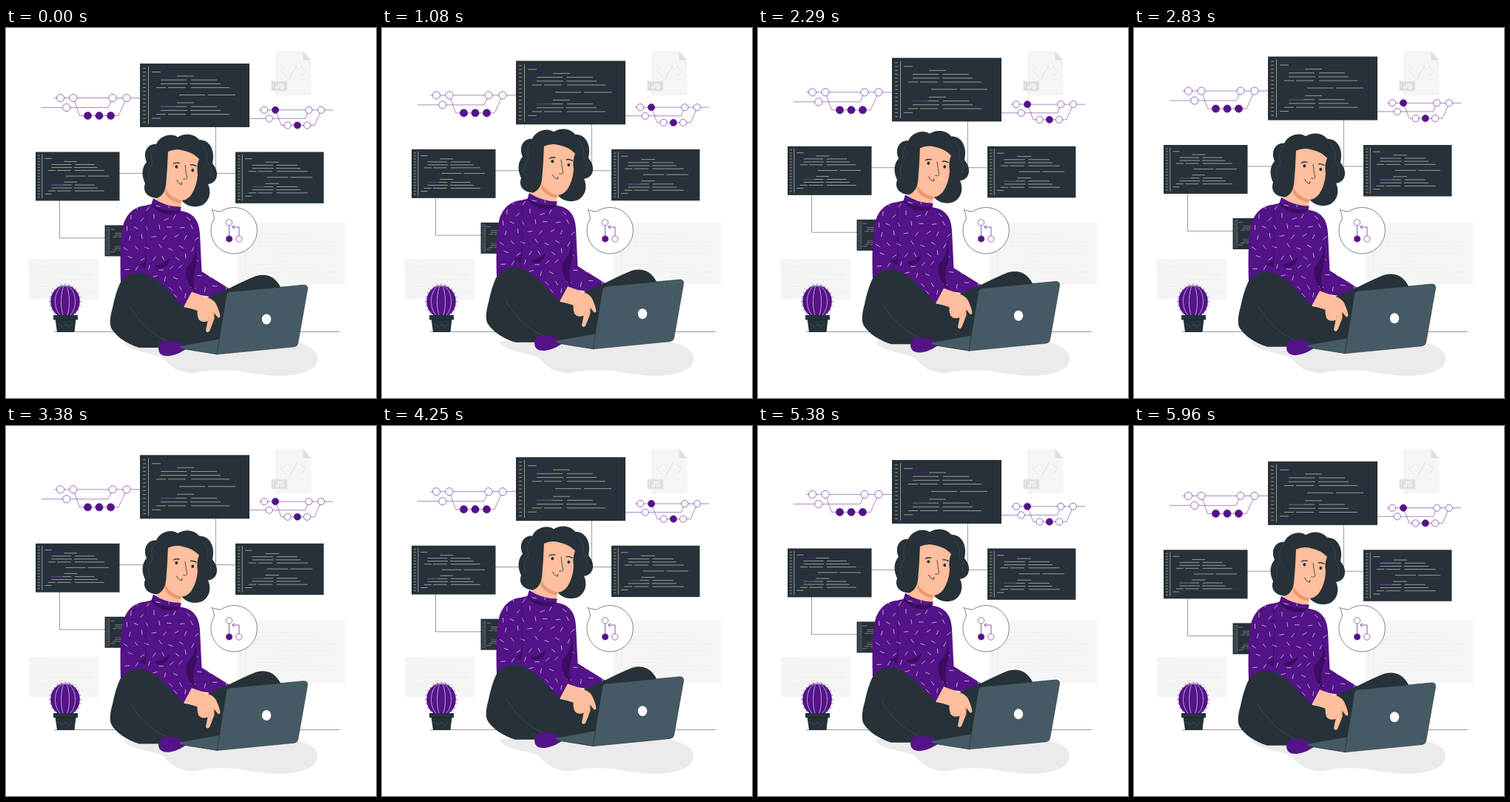
An HTML page with a canvas for the animation above (6 s loop, 500 by 500 pixels).

```html
<!DOCTYPE html>
<html lang="en">
<head>
<meta charset="utf-8">
<title>Developer at work</title>
<style>
  html, body { margin: 0; width: 100%; height: 100%; overflow: hidden; background: #fff; }
  canvas { display: block; width: 100vw; height: 100vh; }
</style>
</head>
<body>
<canvas id="stage"></canvas>
<script>
const canvas = document.getElementById('stage');
const ratio = window.devicePixelRatio || 1;
canvas.width = canvas.height = 500 * ratio;
const ctx = canvas.getContext('2d');

const DARK = '#263238', SLATE = '#455a64', PURPLE = '#541388', DEEP = '#3b0d60',
      SKIN = '#ffbe9d', BLUSH = '#eb996e', PALE = '#f5f5f5', MIST = '#ebebeb', GREY = '#e0e0e0';

const toPath = d => typeof d === 'string' ? new Path2D(d) : d;

function fill(d, color) {
  ctx.fillStyle = color;
  ctx.fill(toPath(d));
}

function stroke(d, color, width = 0.6) {
  ctx.strokeStyle = color;
  ctx.lineWidth = width;
  ctx.stroke(toPath(d));
}

function rect(x, y, w, h, color) {
  ctx.fillStyle = color;
  ctx.fillRect(x, y, w, h);
}

function oval(x, y, rx, ry = rx) {
  const p = new Path2D();
  p.ellipse(x, y, rx, ry, 0, 0, Math.PI * 2);
  return p;
}

function random(seed) {
  return () => (seed = seed * 16807 % 2147483647) / 2147483647;
}

// Start and end of each dash in a block of code; every editor shows the block twice
const block = [[50, 73], [28, 63, 69, 104], [28, 64, 68, 109], [22, 35, 38, 62, 69, 121]];
const ROW = 5.2;

function editor(x, y, scale, back, text, accent) {
  const plain = new Path2D('M11.5 4V82'), bright = new Path2D();
  const dash = (p, y, a, b) => { p.moveTo(a, y); p.lineTo(b, y); };
  for (let i = 0; i < 15; i++) dash(plain, 6.5 + i * ROW, 4, 8);
  for (const top of [0, 36]) {
    block.forEach((xs, row) => {
      for (let i = 0; i < xs.length; i += 2) dash(plain, top + 17 + row * ROW, xs[i], xs[i + 1]);
    });
    dash(bright, top + (top ? 22 : 17), 22, 48);
    dash(bright, top + 17 + 3 * ROW, 124, 136);
  }
  dash(plain, 42.5, 53, 88);
  dash(plain, 42.5, 92, 129);
  dash(plain, 11.5, 16, 28);
  dash(plain, 74, 16, 28);
  dash(bright, 6.5, 16, 28);
  dash(bright, 79, 16, 28);

  ctx.save();
  ctx.translate(x, y);
  ctx.scale(scale, scale);
  rect(0, 0, 148, 86, back);
  stroke(plain, text, 0.6 / Math.max(scale, 0.7));
  stroke(bright, accent, 0.8 / Math.max(scale, 0.7));
  ctx.restore();
}

function screen(x, y, scale) {
  editor(x, y, scale, DARK, '#dfe3e5', PURPLE);
}

function nodes(y, r, xs, full) {
  for (const x of xs) {
    fill(oval(x, y, r), full ? PURPLE : '#fff');
    stroke(oval(x, y, r), PURPLE);
  }
}

function drawBackdrop() {
  rect(0, 0, 500, 500, '#fff');
  editor(30.5, 312, 0.642, PALE, MIST, MIST);
  editor(312.3, 262.3, 0.985, PALE, MIST, MIST);

  fill('M364 31H401.5L412.5 43.5V91H364Z', PALE);
  fill('M401.5 31L412.5 43.5H401.5Z', GREY);
  stroke('M379 52L371.5 58.5L379 65M393.5 49.5L383 67.5M398 52L405.5 58.5L398 65', GREY, 1);
  rect(358.5, 72, 21.5, 13, GREY);
  ctx.fillStyle = '#fff';
  ctx.font = '600 9.5px Inter, "Open Sans", sans-serif';
  ctx.textAlign = 'center';
  ctx.fillText('JS', 370, 82);

  stroke('M65 410.5H451', DARK, 0.5);
  fill('M158 424C170 440 200 438 212 446C222 456 230 467 256 466C285 460 310 462 335 467C365 472 405 472 419 455C428 436 405 425 380 423L190 420Z', MIST);
}

function drawCactus() {
  const spines = new Path2D();
  for (let i = 0; i < 24; i++) {
    const a = i / 24 * Math.PI * 2, c = Math.cos(a), s = Math.sin(a);
    spines.moveTo(80 + c * 19, 369.5 + s * 21);
    spines.lineTo(80 + c * 22, 369.5 + s * 24);
  }
  stroke(spines, PURPLE);
  fill(oval(80, 369.5, 19.8, 22), PURPLE);
  for (const rx of [5.5, 13.5]) stroke(oval(80, 369.5, rx, 21.5), '#e6dcef', 0.7);
  fill('M66.5 393H94.5L92.5 411H69Z', DARK);
  rect(64, 388, 33, 6.3, DARK);
  stroke('M67 394.4H94', '#11191d');
  stroke('M71 400L76 404.5L80.5 400L85 404.5L90 400', SLATE, 0.8);
}

function drawBubble() {
  const shape = 'M278 245.5Q284 248 290.5 248A31.2 31.2 0 1 1 281.5 257.5Q281 250 278 245.5Z';
  fill(shape, '#fff');
  stroke(shape, DARK);
  stroke('M301.5 267V281M315 281V269H306M309 266.5L305.7 269L309 271.8', PURPLE, 0.7);
  nodes(262.8, 4.2, [301.5]);
  nodes(285, 4.2, [314.8]);
  nodes(285, 4.1, [301.6], true);
}

function drawScreens() {
  stroke('M283.3 133V196.4M153 196.4H311M72.5 233V283.8H134', DARK, 0.5);
  screen(133.5, 266.5, 0.488);
  screen(181, 48, 1);
  screen(40, 167.5, 0.767);
  screen(310, 167.5, 0.807);

  stroke('M65 94.5H181M91 94.5L99.5 118.5H152L163 94.5M48 107.5H138L144 94.5', PURPLE, 0.5);
  nodes(94.5, 5.1, [73.5, 91, 144, 163]);
  nodes(107.5, 5.1, [81.8]);
  nodes(118.5, 5.1, [110.5, 126, 141.5], true);

  stroke('M342 110.8H442M364 110.8L372 131.5H417L426 110.8M329 122.4H404.5L409 110.8', PURPLE, 0.5);
  nodes(110.8, 4.6, [349, 409.2, 425.8]);
  nodes(110.8, 4.6, [364], true);
  nodes(122.4, 4.6, [355.7]);
  nodes(131.5, 4.6, [380.6, 407]);
  nodes(131.5, 4.6, [393.8], true);
}

function drawHead() {
  fill('M232 147.5C225 142 209 144 203 157C192 156 184 167 190 181C182 190 184 202 188 210C184 222 192 229 204 230Q212 230 217 224L236 231C242 241 256 244 266 239C275 233 278 222 273 211C285 210 290 196 279 183C283 166 276 151 261 151C254 142 240 142 232 147.5Z', DARK);
  fill('M216 212Q215 226 202 231Q214 246 235 246L238 230Z', SKIN);
  fill('M219 167Q230 162 241 166Q252 168 261 177Q257 186 259 198Q258 214 250 226Q243 234 236 233Q221 228 216 214Q218 192 219 167Z', SKIN);
  fill('M215.500 217Q222 230 237 233L236 237Q220 234 215 224Z', BLUSH);
  stroke('M203 158Q193 171 198 183Q189 194 194 207M264 157Q275 167 271 180Q280 190 276 201', SLATE, 0.5);

  ctx.lineCap = 'round';
  stroke('M226.500 183.500Q229 181.500 234 182.500M249.500 185Q253 184 257 186.500', DARK, 1.4);
  fill(oval(230.3, 187.5, 1.9, 2.2), DARK);
  fill(oval(252.3, 192.2, 1.9, 2.2), DARK);
  stroke('M242 185.500Q243 195 244.800 203Q243 205.500 239.500 204.300', DARK, 0.8);
  stroke('M230.800 205.500Q232.500 210.500 237.500 211.500L237.800 208.500', DARK, 0.9);
  ctx.lineCap = 'butt';
}

const sweater = new Path2D('M199 230Q216 242 237 241.500L235.500 247C252 249 261 259 262 278L264.500 329L303 353L275 363L250 359L240 378L200 378L155 345Q153 285 159 264Q167 242 188 240L196.500 238Z');

// Short random stitches, one in each cell of a staggered grid
function stitches() {
  const next = random(29), p = new Path2D();
  for (let row = 0; row < 10; row++)
    for (let col = 0; col < 11; col++) {
      const x = 160 + col * 15 + row % 2 * 7 + next() * 5;
      const y = 240 + row * 13.5 + next() * 6;
      const a = next() * Math.PI, c = Math.cos(a) * 3.3, s = Math.sin(a) * 3.3;
      p.moveTo(x - c, y - s);
      p.lineTo(x + c, y + s);
    }
  return p;
}
const knit = stitches();

function drawSweater() {
  fill(sweater, PURPLE);
  ctx.save();
  ctx.clip(sweater);
  stroke(knit, '#eee4f5', 0.7);
  fill('M196 237Q212 249 236 246Q230 254 214 251Q200 247 196 237Z', DEEP);
  fill('M256 292Q257 312 244 324Q240 341 256 357Q250 340 257 320Q259 305 256 292Z', DEEP);
  fill('M201 321Q213 319 221 311Q220 323 208 325Q203 325 201 321Z', DEEP);
  fill('M179 320Q186 318 189 314L188 325Z', DEEP);
  stroke('M188.500 247Q190 285 188.500 320', DEEP, 0.8);
  ctx.restore();
}

function drawLegs() {
  fill('M178 331C193 330 209 344 222 358L240 377L260 381L274 363L301 352Q325 340 338 335Q360 329 371 350L371 405L290 432H180C164 427 150 418 143 407Q138 399 144 378Q148 358 154 345Q163 331 178 331Z', DARK);
  stroke('M167 376Q181 400 204 416Q219 425 236 429', SLATE);
  fill('M206 434Q206 427 213 423Q229 421 248 430Q235 441 222 443Q207 445 206 434Z', PURPLE);
}

function drawLaptop() {
  const base = 'M233 430L288.500 420L286 441L236 433Z';
  const lid = 'M303 356.500L402 347.200Q408.500 347 407.500 353L394.700 425.500Q394 430 389.500 430.800L285 441L297.800 361Q298.500 357 303 356.500Z';
  fill(base, SLATE);
  stroke(base, DARK, 0.8);
  fill(lid, SLATE);
  stroke(lid, DARK);
  fill(oval(352, 393.5, 6.2, 7), '#fff');
}

function drawHand() {
  fill('M251 356.500L270 363.500Q280 366 284 373Q289 384 289.500 390Q287.500 394 284.500 389L281.500 385L281.500 393Q277 405 275 409.500Q272 413 270 409L272.500 396Q264 399 260 393Q258 387 258.500 382L240.500 376Z', SKIN);
  stroke('M280 383Q282 390 278 396M273 396L274.500 389M281 384L284 388', BLUSH);
}

function drawWoman() {
  drawHead();
  drawSweater();
  drawLegs();
  drawLaptop();
  drawHand();
}

// Constant speed up 10 px and back within one period
function drift(t, period) {
  const p = t % period / period;
  return -10 * (1 - Math.abs(1 - 2 * p));
}

function shifted(dy, draw) {
  ctx.save();
  ctx.translate(0, dy);
  draw();
  ctx.restore();
}

function render(t) {
  ctx.setTransform(ratio, 0, 0, ratio, 0, 0);
  drawBackdrop();
  shifted(drift(t, 6000), drawScreens);
  drawCactus();
  drawBubble();
  shifted(drift(t, 3000), drawWoman);
}

const start = performance.now();
function tick() {
  render(performance.now() - start);
  requestAnimationFrame(tick);
}
tick();
</script>
</body>
</html>
```
